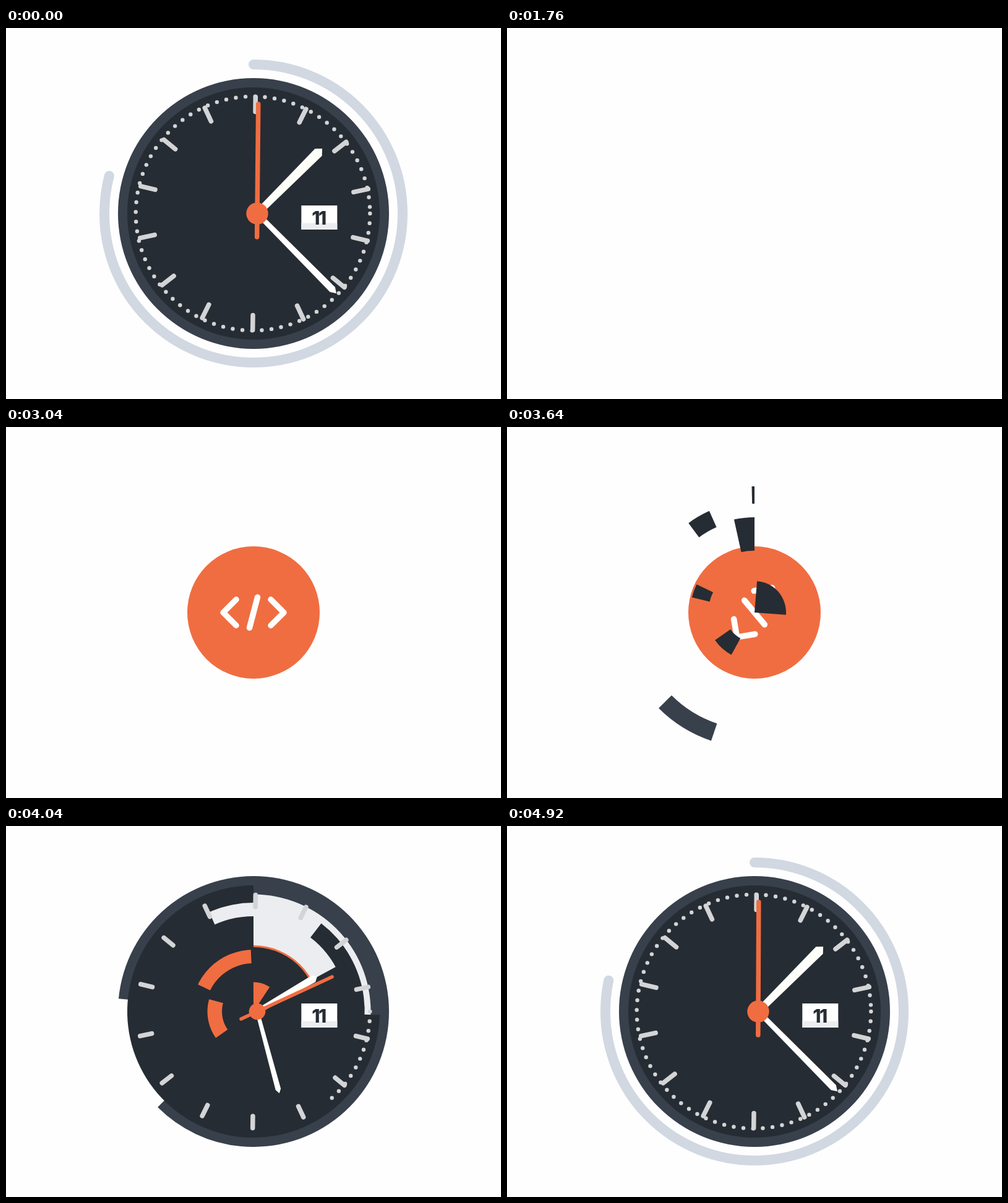
Animation, 800 px wide and 600 px high, one loop 4.96 s. Source, as an HTML page with a canvas:

```html
<!DOCTYPE html>
<html lang="en">
<head>
<meta charset="utf-8">
<title>Watch and code</title>
<style>
  html, body { margin: 0; width: 100%; height: 100%; overflow: hidden; background: #fefefe; }
  canvas { display: block; width: 800px; height: 600px; }
</style>
</head>
<body>
<canvas id="stage" width="800" height="600"></canvas>
<script>
const ctx = document.getElementById('stage').getContext('2d');
const LOOP = 4960, CUT = 1760;
const ORANGE = '#f06d41', DARK = '#262c33', SLATE = '#38404b';
const LIGHT = '#ecedf0', MARK = '#d3d4d6', TRACK = '#d1d8e1';

const clamp = x => Math.min(1, Math.max(0, x));
const sine = x => (1 - Math.cos(Math.PI * x)) / 2;
const cubicOut = x => 1 - (1 - x) ** 3;
const phase = (t, start, dur, ease = sine) => ease(clamp((t - start) / dur));
const rad = deg => deg * Math.PI / 180;
const clock = deg => rad(deg - 90); // 0 is twelve o'clock, clockwise

// Wiped bands: inner radius, outer radius, seam angle, start, duration
const LOGO = [
  [0, 29.5, 315, 1760, 840],
  [28.5, 59, 315, 1833, 840],
  [58, 78, 315, 2085, 840],
  [77, 107, 315, 1771, 1060]
];
const FACE = [
  [47.5, 78, 235, 3521, 688],
  [74.5, 104, 296, 3563, 656],
  [100, 154, 360, 3563, 656],
  [151, 179.7, 336, 3563, 656],
  [176, 204, 360, 3617, 639]
];

function disc(x, y, r, color) {
  ctx.fillStyle = color;
  ctx.beginPath();
  ctx.arc(x, y, r, 0, 2 * Math.PI);
  ctx.fill();
}

// Band that grows counter-clockwise from its seam
function band(inner, outer, seam, sweep, color) {
  if (sweep <= 0) return;
  const a = clock(seam - sweep), b = clock(seam);
  ctx.fillStyle = color;
  ctx.beginPath();
  ctx.arc(400, 300, outer, a, b);
  ctx.arc(400, 300, inner, b, a, true);
  ctx.fill();
}

function wipe(t, [inner, outer, seam, start, dur], color) {
  band(inner, outer, seam, 360 * phase(t, start, dur), color);
}

function line(points, width, color) {
  ctx.strokeStyle = color;
  ctx.lineWidth = width;
  ctx.lineCap = ctx.lineJoin = 'round';
  ctx.beginPath();
  points.forEach(([x, y]) => ctx.lineTo(x, y));
  ctx.stroke();
}

function polygon(points, color) {
  ctx.fillStyle = color;
  ctx.beginPath();
  points.forEach(([x, y]) => ctx.lineTo(x, y));
  ctx.fill();
}

function placed(x, y, deg, scale, draw) {
  ctx.save();
  ctx.translate(x, y);
  ctx.rotate(rad(deg));
  ctx.scale(scale, scale);
  draw();
  ctx.restore();
}

function logo(t) {
  if (t < 2950) LOGO.forEach(b => wipe(t, b, ORANGE));
  else disc(400, 300, 107, ORANGE);
  const rise = start => 160 * (1 - phase(t, start, 600, cubicOut));
  const glyph = (points, dy) => line(points.map(([x, y]) => [x, y + dy]), 9.5, '#fefefe');
  placed(400, 300, -135 * phase(t, 3378, 600), 1, () => {
    glyph([[-28, -21], [-49, 0], [-28, 21]], rise(2061));
    glyph([[6.5, -24.7], [-6.5, 24.7]], rise(2218));
    glyph([[28, -21], [49, 0], [28, 21]], rise(2400));
  });
}

function face(t) {
  wipe(t, [189.5, 219, 225, 3521, 688], SLATE);
  const core = phase(t, 3358, 851);
  band(0, 51, 130 - 143.5 * core, 360 * core, DARK);
  if (t < 4260) FACE.forEach(b => wipe(t, b, DARK));
  else disc(400, 300, 204, DARK);
}

function marks(t) {
  const grow = phase(t, 3800, 340);
  if (grow > 0) for (let i = 0; i < 14; i++) {
    placed(401, 300, 0.7 + i * 360 / 14, 1, () =>
      line([[0, -188.5], [0, -188.5 + 24 * grow]], 7.5, MARK));
  }
  const shown = 360 * phase(t, 3880, 660);
  for (let a = 0; a < shown; a += 4.757) {
    disc(399 + 189.3 * Math.cos(rad(a)), 300 + 189.3 * Math.sin(rad(a)), 3.2, MARK);
  }
}

function dateBox(t) {
  const scale = phase(t, 3760, 240);
  if (!scale) return;
  placed(506.3, 306.5, 0, scale, () => {
    ctx.fillStyle = '#fff';
    ctx.fillRect(-29, -19.5, 58, 39);
    ctx.fillStyle = LIGHT;
    ctx.fillRect(-29, 9, 58, 10.5);
    ctx.fillStyle = DARK;
    ctx.font = '800 30px Inter, "Open Sans", sans-serif';
    ctx.textAlign = 'center';
    ctx.fillText('1', -5.4, 11.3);
    ctx.fillText('1', 5.4, 11.3);
  });
}

function hands(t) {
  const p = phase(t, 3760, 420);
  if (!p) return;
  const left = 1 - p;
  const tick = 3.8 * phase(t, 4840, 480) + 5.4 * phase(t, 5840, 520);
  placed(406, 300, 45 + 60 * left, p, () =>
    polygon([[-5.5, 0], [-8, -140], [0, -148.5], [8, -140], [5.5, 0]], '#fffffa'));
  placed(406, 300, 135.3 + 120 * left, p, () =>
    polygon([[-4, 0], [-5.8, -173], [0, -182], [5.8, -173], [4, 0]], '#fff'));
  placed(406, 300, 264 * left + tick, p, () => {
    line([[0, 38], [0, -177]], 7.5, ORANGE);
    disc(0, 0, 17.7, ORANGE);
  });
}

function track(t) {
  const sweep = 291.7 * phase(t, 4077, 1243, cubicOut);
  if (!sweep) return;
  ctx.strokeStyle = TRACK;
  ctx.lineWidth = 16;
  ctx.lineCap = 'round';
  ctx.beginPath();
  ctx.arc(400, 300, 241, clock(0), clock(sweep));
  ctx.stroke();
}

function draw(ms) {
  // The scene is cut to blank at CUT, so its end wraps past the loop point
  const t = ms < CUT ? ms + LOOP : ms;
  ctx.fillStyle = '#fefefe';
  ctx.fillRect(0, 0, 800, 600);
  if (t < 4260) {
    const glow = phase(t, 3660, 300);
    if (glow) disc(400, 300, 100 + 90 * glow, LIGHT);
    logo(t);
  }
  face(t);
  marks(t);
  dateBox(t);
  hands(t);
  track(t);
}

const began = performance.now();
function loop() {
  draw((performance.now() - began) % LOOP);
  requestAnimationFrame(loop);
}
loop();
</script>
</body>
</html>
```
